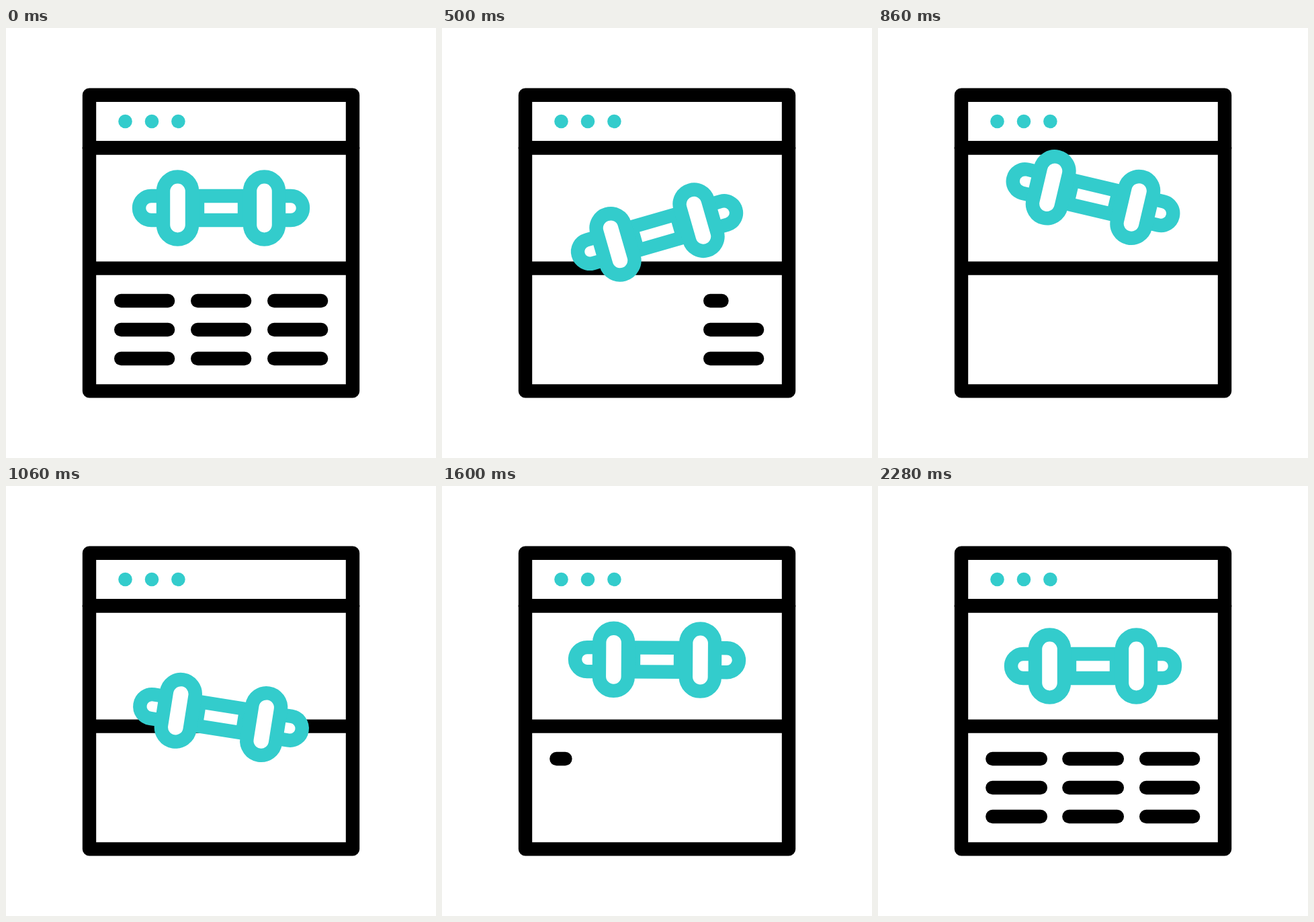
Write an HTML page that moves like this. It is 640x640 px and loops after 2.4 s.

```html
<!DOCTYPE html>
<html lang="en">
<head>
<meta charset="utf-8">
<title>Workout page</title>
<style>
  html, body { margin: 0; width: 100%; height: 100%; overflow: hidden; background: #fff; }
  svg { display: block; width: 100%; height: 100%; }
</style>
</head>
<body>
<svg viewBox="0 0 640 640" fill="none" stroke-width="20.4">
  <g stroke="#000">
    <rect x="124" y="99.7" width="392" height="440.7" stroke-linejoin="round"/>
    <path d="M124 178.4H516" stroke-linecap="round" stroke-width="20.8"/>
    <path d="M124 357.6H516"/>
    <g id="rows" stroke-linecap="round"></g>
  </g>
  <g fill="#3cc">
    <circle cx="177.5" cy="139" r="10.3"/>
    <circle cx="217" cy="139" r="10.3"/>
    <circle cx="256.4" cy="139" r="10.3"/>
  </g>
  <g id="dumbbell" stroke="#3cc" fill="#fff">
    <path d="M-35 -18H35V18H-35Z"/>
    <path d="M-92 -18H-104A18 18 0 0 0 -104 18H-92"/>
    <path d="M92 -18H104A18 18 0 0 1 104 18H92"/>
    <rect x="-86" y="-46.6" width="43" height="93.2" rx="21.5"/>
    <rect x="43" y="-46.6" width="43" height="93.2" rx="21.5"/>
  </g>
</svg>
<script>
const LOOP = 2400, STEP = 20, LAST = 2280;
const rows = document.getElementById('rows');
const dumbbell = document.getElementById('dumbbell');

const bars = Array.from({ length: 9 }, () =>
  rows.appendChild(document.createElementNS('http://www.w3.org/2000/svg', 'path')));

const clamp = v => Math.min(1, Math.max(0, v));

// cubic-bezier(.667, 0, .333, 1)
function ease(x) {
  x = clamp(x);
  let lo = 0, hi = 1;
  for (let i = 0; i < 30; i++) {
    const m = (lo + hi) / 2;
    if (m * (2 - 3 * m + 2 * m * m) < x) lo = m; else hi = m;
  }
  return lo * lo * (3 - 2 * lo);
}

// Evenly spaced eased keys
function track(keys, start, gap, t) {
  const pos = Math.min(keys.length - 1, Math.max(0, (t - start) / gap));
  const i = Math.min(keys.length - 2, Math.floor(pos));
  return keys[i] + (keys[i + 1] - keys[i]) * ease(pos - i);
}

const DROP = [0, 50, -36, 77, -21, 14.6, 0];
const TILT = [0, -16.3, 13.4, -6.7, 2.1, 0];

function drawBars(t) {
  const leaving = t < 1200;
  const done = 9 * (leaving ? ease((t - 22) / 800) : ease((t - 1481) / 799));
  bars.forEach((bar, i) => {
    const col = Math.floor(i / 3), y = 406 + 43 * (i % 3);
    const grow = !leaving && col < 2 ? 0.8 : 0;
    const x = 171.2 + 114 * col - grow;
    const part = clamp(done - i);
    const shown = leaving ? 1 - part : part;
    bar.setAttribute('d', shown > 0.0005
      ? `M${x} ${y}H${(x + (69.9 + 2 * grow) * shown).toFixed(2)}` : '');
  });
}

function draw(t) {
  const y = 268 + track(DROP, 20, 356, t);
  const a = track(TILT, 20, 436, t);
  dumbbell.setAttribute('transform', `translate(320 ${y.toFixed(3)}) rotate(${a.toFixed(3)})`);
  drawBars(t);
}

function tick() {
  const t = performance.now() % LOOP;
  draw(Math.min(LAST, Math.floor(t / STEP) * STEP));
  requestAnimationFrame(tick);
}
tick();
</script>
</body>
</html>
```
